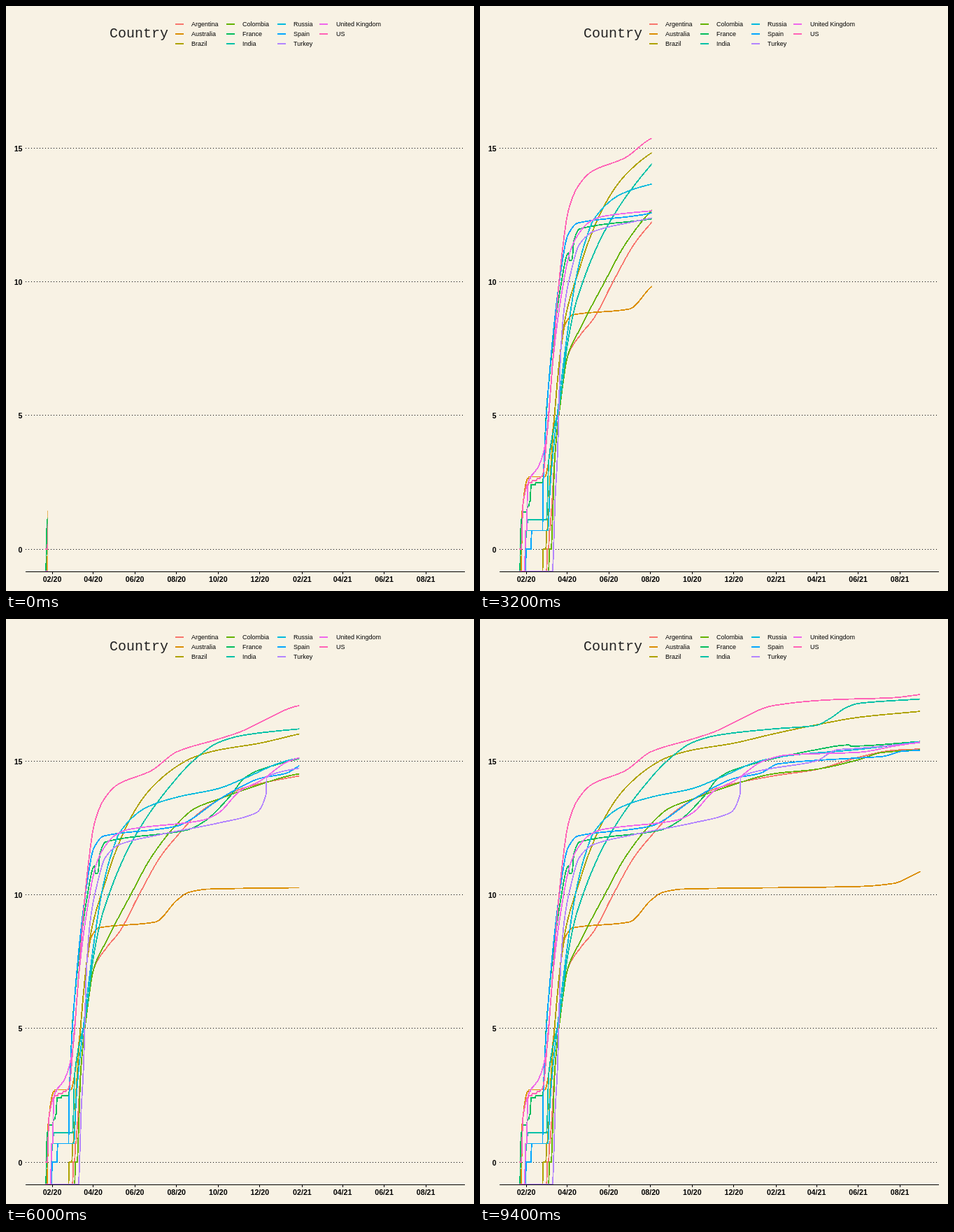
These frames come from a looping animation (669 px wide and 837 px high, 10 s). An HTML page:

```html
<!DOCTYPE html>
<html lang="en">
<head>
<meta charset="utf-8">
<style>
html, body { margin: 0; height: 100%; overflow: hidden; background: #f8f2e4; }
svg { display: block; }
path { fill: none; stroke-width: 1.8; shape-rendering: crispEdges; }
text { font: 9px "Liberation Sans", Arial, sans-serif; }
.axis { font-size: 10.67px; font-weight: bold; }
.title { font: 20px "Liberation Mono", "Courier New", monospace; fill: #222; }
</style>
</head>
<body>
<svg id="chart" width="669" height="837" viewBox="0 0 669 837">
  <clipPath id="reveal"><rect id="window" x="28" y="70" height="740"/></clipPath>
  <text class="title" x="148" y="45">Country</text>
  <g id="grid"></g>
  <g id="lines" clip-path="url(#reveal)"></g>
  <g id="axes"></g>
  <g id="legend"></g>
</svg>
<script>
const firstDay = -10, lastDay = 577, floorY = 809;
const dayX = day => 66 + day * .9765;    // day 0 is 1 February 2020
const logY = value => 777 - value * 38.25;
const get = id => document.getElementById(id);

function draw(parent, tag, attrs, text = '') {
  const node = document.createElementNS('http://www.w3.org/2000/svg', tag);
  for (const key in attrs) node.setAttribute(key, attrs[key]);
  node.textContent = text;
  get(parent).append(node);
}

const line = (parent, d, attrs) => draw(parent, 'path', { d, stroke: '#000', ...attrs });

// Monotone cubic through day, value pairs
function spline(keys) {
  const days = keys.filter((_, i) => i % 2 === 0), values = keys.filter((_, i) => i % 2);
  const slope = i => (values[i + 1] - values[i]) / (days[i + 1] - days[i]);
  const tangent = days.map((_, i) => {
    const a = slope(Math.max(i - 1, 0)), b = slope(Math.min(i, days.length - 2));
    return a * b > 0 ? 2 * a * b / (a + b) : 0;
  });
  return day => {
    const i = Math.max(0, days.findIndex(d => d >= day) - 1);
    const h = days[i + 1] - days[i], t = (day - days[i]) / h, u = 1 - t;
    return u * u * (1 + 2 * t) * values[i] + t * t * (3 - 2 * t) * values[i + 1]
      + t * u * h * (u * tangent[i] - t * tangent[i + 1]);
  };
}

// Log of whole daily case counts: rounding makes the early stairs
function curve(keys) {
  const value = spline(keys), points = [];
  for (let day = firstDay; day <= lastDay; day++) {
    const y = day < keys[0] ? floorY : logY(Math.log(Math.round(Math.exp(value(day)))));
    points.push(`${dayX(day).toFixed(2)} ${y.toFixed(2)}`);
  }
  return 'M' + points.join('L');
}

const columns = [242, 315, 388, 448];
let count = 0;

function series(name, stroke, ...keys) {
  const x = columns[count / 3 | 0], y = 26 + count % 3 * 14;
  count++;
  line('legend', `M${x} ${y}h12`, { stroke });
  draw('legend', 'text', { x: x + (x === 448 ? 24 : 23), y: y + 3 }, name);
  line('lines', curve(keys), { stroke });
}

series('Argentina', '#f8766d', 31,0, 35,.7, 42,3.45, 50,5.6, 61,7.24, 80,8.03, 99,8.63, 127,9.99, 158,11.4,
  183,12.2, 211,12.97, 243,13.54, 281,14, 361,14.44, 424,14.68, 488,15.15, 537,15.4, 577,15.45);
series('Australia', '#db8e00', -6,1.5, 0,2.48, 5,2.71, 27,2.71, 37,4, 50,7.3, 57,8.39, 68,8.76, 151,8.98,
  183,9.8, 200,10.09, 229,10.21, 488,10.31, 537,10.42, 577,10.87);
series('Brazil', '#aea200', 25,0, 31,.7, 36,3.06, 50,7.35, 59,8.86, 78,10.48, 90,11.42, 117,12.97, 143,13.93,
  183,14.81, 211,15.18, 243,15.41, 304,15.67, 361,16.01, 424,16.35, 488,16.64, 577,16.86);
series('Colombia', '#64b200', 34,0, 37,.3, 42,3.45, 50,5.44, 61,7.24, 78,8.2, 115,10, 145,11.4, 183,12.65,
  209,13.23, 243,13.57, 291,14.01, 361,14.52, 424,14.69, 488,15.06, 521,15.32, 577,15.42);
series('France', '#00bd5c', -8,.7, -7,1.1, 6,1.8, 7,2.4, 24,2.5, 30,5.3, 50,9.73, 62,11.08, 63,10.8, 67,10.81,
  70,11.55, 78,11.97, 197,12.42, 222,12.73, 260,13.67, 281,14.35, 304,14.67, 424,15.42, 473,15.6, 475,15.56,
  577,15.73);
series('India', '#00c1a7', -1,0, 2,1.1, 30,1.1, 33,3.3, 50,5.6, 61,7.76, 75,9.39, 120,12.13, 183,14.38, 211,15.11,
  243,15.69, 281,15.97, 361,16.2, 424,16.33, 444,16.58, 470,17.02, 488,17.16, 577,17.32);
series('Russia', '#00bade', -1,.7, 32,.7, 35,2.3, 50,5.96, 66,9.07, 74,10.25, 84,11.3, 100,12.37, 137,13.25,
  183,13.65, 243,13.97, 281,14.35, 342,15, 383,15.2, 488,15.44, 577,15.73);
series('Spain', '#00a6ff', 0,0, 7,0, 8,.7, 24,.7, 25,2.5, 34,6.5, 50,10.25, 61,11.74, 76,12.2, 158,12.46,
  183,12.57, 200,12.77, 243,13.54, 281,14.1, 304,14.35, 342,14.54, 370,14.9, 488,15.12, 521,15.17, 552,15.37,
  577,15.4);
series('Turkey', '#b385ff', 40,0, 42,1.65, 46,3.6, 50,7.1, 56,9.07, 65,10.3, 78,11.4, 98,11.87, 158,12.25,
  243,12.68, 299,13.07, 313,13.75, 314,14.38, 337,14.61, 361,14.73, 424,15, 455,15.42, 488,15.48, 577,15.69);
series('United Kingdom', '#ef67eb', -1,.7, 1,.7, 2,2.4, 20,3.2, 30,4.2, 39,7, 50,9.25, 64,11.1, 76,11.76,
  91,12.2, 110,12.43, 219,12.78, 243,13.05, 276,13.9, 304,14.25, 347,15, 383,15.23, 488,15.33, 537,15.55,
  577,15.71);
series('US', '#ff63b6', -10,0, -7,0, -5,1.6, 2,2.4, 24,2.77, 33,5.1, 50,10.46, 62,12.68, 76,13.57, 96,14.12,
  145,14.64, 183,15.35, 243,15.82, 276,16.1, 304,16.44, 361,17.07, 444,17.29, 537,17.37, 577,17.49);

const thin = { 'stroke-width': 1 };
for (let value = 0; value <= 15; value += 5) {
  const y = Math.floor(logY(value));
  line('grid', `M28 ${y + .5}H655`, { ...thin, 'stroke-dasharray': '1 3' });
  draw('axes', 'text', { class: 'axis', x: 23.5, y: y + 5, 'text-anchor': 'end' }, value);
}

line('axes', 'M28 809.5H656', thin);
const start = Date.UTC(2020, 1, 1);
for (let m = 1; m < 20; m += 2) {
  const date = new Date(Date.UTC(2020, m, 1));
  const x = dayX((date - start) / 864e5);
  const [year, month] = date.toISOString().split('-');
  line('axes', `M${Math.floor(x) + .5} 810v3`, thin);
  draw('axes', 'text', { class: 'axis', x, y: 824, 'text-anchor': 'middle' }, `${month}/${year.slice(2)}`);
}

function frame(now) {
  const step = Math.min(92, Math.max(0, Math.floor(now % 10000 / 100) - 2));
  get('window').setAttribute('width', 31.6 + 6.2 * step);
  requestAnimationFrame(frame);
}
frame(performance.now());
</script>
</body>
</html>
```
